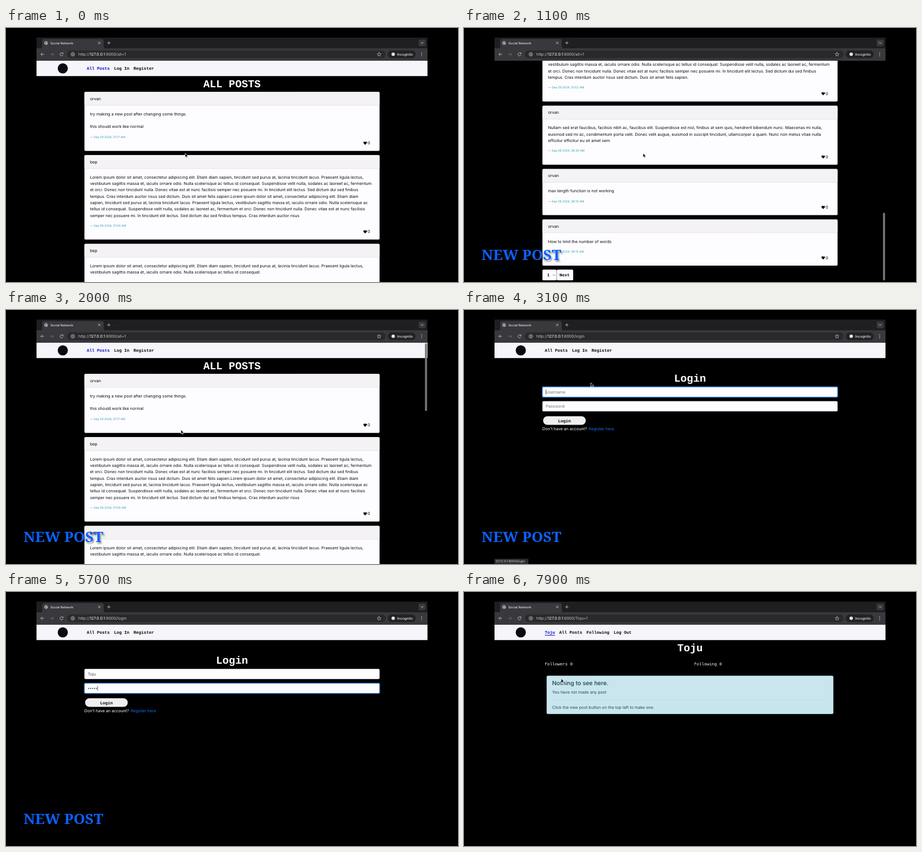
Write an HTML page that moves like this. It is 800x450 px and loops after 8 s.

```html
<!DOCTYPE html>
<html lang="en">
<head>
<meta charset="utf-8">
<style>
html, body { margin: 0; width: 100%; height: 100%; overflow: hidden; background: #000; }
svg { position: absolute; left: 0; top: 0; font-family: Inter, sans-serif; }
text { white-space: pre; text-rendering: geometricPrecision; }
.mono { font-family: "Liberation Mono", monospace; }
.bold { font-weight: 700; }
.mid { font-weight: 500; }
#title { position: absolute; left: 31px; top: 383.3px; white-space: pre; color: #0a62ff;
  font: 700 26px "Noto Serif", serif; text-shadow: 2px 3px 3px rgba(0,0,0,.42); }
#title span { display: inline-block; }
</style>
</head>
<body>
<svg id="stage" width="800" height="450" viewBox="0 0 800 450"></svg>
<div id="title"></div>
<script>
const LOOP = 8000, LINE = 11.295, BODY = 7.18, BOTTOM = 866.8, USER = "Toju";
const INK = "#0a0a0a", BLUE = "#0b10c8", PAPER = "#fdfcff";

const rect = (x, y, w, h, fill, r = 0, more = "") =>
  `<rect x="${x}" y="${y}" width="${w}" height="${h}" rx="${r}" fill="${fill}" ${more}/>`;
const text = (x, y, str, size, fill, cls = "", more = "") =>
  `<text x="${x}" y="${y}" font-size="${size}" fill="${fill}" class="${cls}" ${more}>${str}</text>`;
const line = (d, stroke, width = 1) =>
  `<path d="${d}" fill="none" stroke="${stroke}" stroke-width="${width}" stroke-linecap="round" stroke-linejoin="round"/>`;
const group = (id, body) => `<g id="${id}">${body}</g>`;
const heading = (str, y) => text(400, y, str, 18.83, "#fff", "mono bold", 'text-anchor="middle"');

// Post texts
const L1 = "Lorem ipsum dolor sit amet, consectetur adipiscing elit. Etiam diam sapien, tincidunt sed purus at, lacinia tincidunt lacus. Praesent ligula lectus,";
const L2 = "vestibulum sagittis massa et, iaculis ornare odio. Nulla scelerisque ac tellus id consequat.";
const L2b = L2 + " Suspendisse velit nulla, sodales ac laoreet ac, fermentum";
const L3 = "et orci. Donec non tincidunt nulla. Donec vitae est at nunc facilisis semper nec posuere mi. In tincidunt elit lectus. Sed dictum dui sed finibus";
const L4 = "tempus. Cras interdum auctor risus sed dictum. Duis sit amet felis sapien.";
const S1 = "Suspendisse velit nulla, sodales ac laoreet ac, fermentum et orci. Donec non tincidunt nulla. Donec vitae est at nunc facilisis semper nec posuere";
const S2 = "mi. In tincidunt elit lectus. Sed dictum dui sed finibus " + L4;
const posts = [
  ["orvan", "09 2024, 01:17", ["try making a new post after changing some things.", "", "this should work like normal"]],
  ["bep", "09 2024, 01:04", [L1, L2b, L3,
    L4 + "Lorem ipsum dolor sit amet, consectetur adipiscing elit. Etiam diam",
    "sapien, tincidunt sed purus at, lacinia tincidunt lacus. Praesent ligula lectus, vestibulum sagittis massa et, iaculis ornare odio. Nulla scelerisque ac",
    "tellus id consequat. Suspendisse velit nulla, sodales ac laoreet ac, fermentum et orci. Donec non tincidunt nulla. Donec vitae est at nunc facilisis",
    "semper nec posuere mi. In tincidunt elit lectus. Sed dictum dui sed finibus tempus. Cras interdum auctor risus"]],
  ["bep", "09 2024, 01:04", [L1, L2, "", S1, S2]],
  ["bep", "09 2024, 01:04", [L1, L2b, L3, L4]],
  ["dumpling", "09 2024, 01:03", ["Man, could do with a dumpling right now", "", "right now", "", "and we-"]],
  ["bep", "09 2024, 01:03", [S1, S2]],
  ["bep", "09 2024, 01:02", [L1, L2b, L3, L4]],
  ["orvan", "08 2024, 08:30", [
    "Nullam sed erat faucibus, facilisis nibh ac, faucibus elit. Suspendisse est nisl, finibus at sem quis, hendrerit bibendum nunc. Maecenas mi nulla,",
    "euismod sed mi ac, condimentum porta velit. Donec velit augue, euismod in suscipit tincidunt, ullamcorper a quam. Nunc non metus vitae nulla",
    "efficitur efficitur eu sit amet sem"]],
  ["orvan", "08 2024, 08:19", ["max length function is not working"]],
  ["orvan", "08 2024, 08:15", ["How to limit the number of words"]]
];

function post(top, [name, date, lines]) {
  const stamp = top + 57.2 + LINE * (lines.length - 1), h = 70.5 + LINE * lines.length;
  const hy = stamp + 7.4;
  return rect(138.8, top, 522.4, h, PAPER, 1.9) +
    rect(138.8, top, 522.4, 23.6, "#f4f2f5", 1.9) +
    rect(138.8, top + 23.4, 522.4, .6, "#d8d6da") +
    text(148.7, top + 14.7, name, BODY, INK) +
    lines.map((s, i) => text(148.7, top + 41.6 + LINE * i, s, BODY, INK)).join("") +
    text(148.7, stamp + 1.8, `— Sep ${date} AM`, 5.15, "#2a9fb0") +
    `<path d="M635.7 ${hy + 6.4}l-2.7-2.8c-1.3-1.6.9-4.2 2.7-2.1c1.8-2.1 4 .5 2.7 2.1z" fill="#000"/>` +
    text(640, hy + 5.8, "0", BODY, INK);
}

function feed() {
  let y = 113.3, out = heading("ALL POSTS", 105);
  for (const p of posts) {
    out += post(y, p);
    y += 78.1 + LINE * p[2].length;
  }
  return out + rect(138.8, y - .5, 25, 19, PAPER, 1.9) + rect(164.2, y - .5, 29, 19, PAPER, 1.9) +
    text(147, y + 11.5, "1", 7.53, INK, "mono bold") +
    line(`M157.5 ${y + 8.5}l1.8 1.8l1.8-1.8`, "#444", .7) +
    text(169, y + 11.5, "Next", 7.53, INK, "mono bold");
}

const field = (id, y) =>
  rect(138.8, y, 522.4, 18, PAPER, 1.9) +
  rect(138.6, y - .2, 522.8, 18.4, "none", 2.2, `id="${id}" stroke="#2f6fc4" stroke-width="1.5"`);

const login = heading("Login", 127.4) + field("ring0", 136.2) + field("ring1", 161.6) +
  text(144.7, 147.8, "", BODY, "#6c757d", "", 'id="user"') +
  text(144.7, 173.2, "Password", BODY, "#6c757d", "", 'id="hint"') + group("dots", "") +
  rect(0, 0, .7, 8.5, "#222", 0, 'id="caret"') +
  rect(140, 188.2, 75.5, 15.2, "#efeff0", 7.6) +
  text(177.8, 198.7, "Login", 7.53, INK, "mono bold", 'text-anchor="middle"') +
  text(138.8, 213.2, "Don't have an account?", 7.1, "#fff") +
  text(220.8, 213.2, "Register here.", 7.1, "#0d76f0");

const profile = heading(USER, 105) +
  text(142.7, 129.6, "followers 0", 7.53, "#fff", "mono") +
  text(407, 129.6, "following 0", 7.53, "#fff", "mono") +
  rect(146.5, 148.6, 507, 67.3, "#c9e6ee", 1.9, 'stroke="#b5dce6" stroke-width=".5"') +
  text(156, 165, "Nothing to see here.", 10.3, "#1b3f48", "mid") +
  text(156, 180.4, "You have not made any post", BODY, "#1f4d58") +
  rect(156, 190.8, 490, .5, "#b2d5de") +
  text(156, 207, "Click the new post button on the top left to make one.", BODY, "#1f4d58");

function navLinks(names, active, underlined) {
  let x = 143;
  return names.map(n => {
    const w = n.length * 4.518, fill = n === active ? BLUE : "#080808";
    const out = text(x, 74.2, n, 7.53, fill, "mono bold") +
      (n === underlined ? rect(x, 76.2, w, 1, BLUE) : "");
    x += w + 7.53;
    return out;
  }).join("");
}
const nav = rect(54, 58, 692, 27.2, "#f5f5fa") +
  '<circle cx="100.5" cy="71.6" r="9" fill="#0a0a12"/>' + group("links", "");

const icon = "#c9c8cc";
const browser = rect(0, 0, 800, 17, "#000") + rect(0, 17, 54, 41, "#000") + rect(746, 17, 54, 41, "#000") +
  rect(54, 17, 692, 20, "#1f1e21") +
  '<path d="M60 36.5q4 0 4-4v-9q0-4 4-4h101q4 0 4 4v9q0 4 4 4z" fill="#39383c"/>' +
  rect(54, 36, 692, 22, "#39383c") +
  '<circle cx="71" cy="26.5" r="3.2" fill="#a9a8ad"/>' +
  line("M69 25l2 1.2l-.8 1.6M72.3 24.2l.5 1.3l1 .2", "#39383c", .7) +
  text(78.5, 28.5, "Social Network", 5.6, "#e6e5e8", "mid") +
  line("M163.3 24.6l3.6 3.6m0-3.6l-3.6 3.6", "#dddce0", .8) +
  line("M179.5 26.4h5m-2.5-2.5v5", icon, .8) +
  rect(730.3, 20.6, 12.6, 11.6, "#39383c", 3) + line("M734.7 25.6l1.9 1.9l1.9-1.9", "#eee", .8) +
  line("M67.2 46.6h-5.4m2.4-2.5l-2.5 2.5l2.5 2.5", icon, .8) +
  line("M78.6 46.6h5.4m-2.4-2.5l2.5 2.5l-2.5 2.5", "#77767a", .8) +
  line("M100.6 45a2.8 2.8 0 1 0 .3 2.6M100.9 43.6v1.8h-1.8", icon, .8) +
  rect(108, 39.8, 564, 13.6, "#29282b", 6.8) +
  '<circle cx="118.2" cy="46.6" r="5.2" fill="#39383c"/><circle cx="118.2" cy="46.6" r="2.7" fill="none" stroke="#ddd" stroke-width=".7"/>' +
  line("M118.2 46.4v1.4M118.2 45.2v.01", "#ddd", .7) +
  text(128, 49, "", 7.05, "#c4c3c7", "", 'id="url"') +
  line("M660.3 43.3l1 2.2l2.4.2l-1.8 1.6l.5 2.4l-2.1-1.3l-2.1 1.3l.5-2.4l-1.8-1.6l2.4-.2z", icon, .7) +
  rect(675.6, 39.8, 49.5, 13.6, "#222124", 6.8) +
  '<circle cx="685.3" cy="46.6" r="3" fill="#e4e3e6"/>' +
  text(692.3, 48.9, "Incognito", 6.2, "#eee", "mid") +
  [43.7, 46.5, 49.3].map(y => `<circle cx="735.7" cy="${y}" r=".75" fill="${icon}"/>`).join("");

const $ = id => document.getElementById(id);
$("stage").innerHTML =
  group("page", group("feed", feed()) + group("login", login) + group("profile", profile) + nav) +
  rect(741.6, 0, 3.6, 120, "#777", 1.8, 'id="thumb"') + browser +
  group("status", rect(54, 440.8, 60, 9.2, "#2d2c2f", 1) + text(56, 447.3, "", 5.6, "#d5d4d8", "", 'id="link"')) +
  '<path id="cursor" d="M0 0v7.2l1.7-1.5l1.1 2.5l1.3-.6l-1.1-2.4h2.3z" fill="#000" stroke="#fff" stroke-width=".7"/>';
$("title").innerHTML = [..."NEW POST"].map(c => `<span>${c}</span>`).join("");
const letters = [...$("title").children];

// Timing
const clamp = (t, a, b) => Math.min(1, Math.max(0, (t - a) / (b - a)));
const ease = (t, a, b) => { const k = clamp(t, a, b); return k * k * (3 - 2 * k); };
const between = (t, a, b) => t >= a && t < b;
const show = (id, on) => $(id).setAttribute("visibility", on ? "visible" : "hidden");
const path = [[0, 317, 222], [1900, 317, 222], [2550, 204, 71], [2880, 204, 71], [3100, 224.5, 129],
  [5850, 224.5, 129], [6150, 203.5, 199.5], [6520, 203.5, 199.5], [6950, 152, 71], [7350, 152, 71], [7800, 172, 153.5]];

function cursorAt(t) {
  const i = path.findIndex(p => p[0] > t);
  if (i < 0) return path[path.length - 1].slice(1);
  const [a, x, y] = path[i - 1], [b, u, v] = path[i], k = ease(t, a, b);
  return [x + (u - x) * k, y + (v - y) * k];
}

let navState;
function setNav(state) {
  if (state === navState) return;
  navState = state;
  const [member, active, url] = state.split("|");
  const names = member ? [USER, "All Posts", "Following", "Log Out"] : ["All Posts", "Log In", "Register"];
  $("links").innerHTML = navLinks(names, active, member && USER);
  $("url").innerHTML = `http://<tspan fill="#fff">127.0.0.1</tspan>:8000/${url}`;
}

function drawForm(t) {
  const typed = Math.floor(clamp(t, 3850, 4450) * 4), second = t >= 4800;
  const n = Math.floor(clamp(t, 4860, 5560) * 5);
  $("user").textContent = typed ? USER.slice(0, typed) : "Username";
  $("user").setAttribute("fill", typed ? "#495057" : "#6c757d");
  show("hint", !n);
  $("dots").innerHTML = Array.from({ length: n }, (_, i) =>
    `<circle cx="${146.4 + 3.4 * i}" cy="170.8" r=".95" fill="#333"/>`).join("");
  show("ring0", !second);
  show("ring1", second);
  const typing = between(t, 3850, 4600) || between(t, 4800, 5800);
  show("caret", typing || (t - 2900) % 1000 < 500);
  const width = typed ? $("user").getComputedTextLength() : 0;
  $("caret").setAttribute("x", second ? 144.7 + 3.4 * n : 144.7 + width);
  $("caret").setAttribute("y", second ? 166.4 : 141);
}

function draw(t) {
  const onLogin = between(t, 2900, 6400), onProfile = t >= 7300;
  for (const [id, on] of [["feed", !onLogin && !onProfile], ["login", onLogin], ["profile", onProfile]])
    $(id).style.display = on ? "" : "none";
  setNav(onProfile ? `1|${USER}|${USER}=1` : onLogin ? "||login" : t >= 6400 ? "1|All Posts|all=1" : "|All Posts|all=1");
  if (onLogin) drawForm(t);

  const scroll = BOTTOM * (ease(t, 301, 1141) - ease(t, 1540, 1860));
  $("page").setAttribute("transform", `translate(0 ${-scroll})`);
  $("thumb").setAttribute("y", 59 + 270 * scroll / BOTTOM);
  $("thumb").setAttribute("opacity", t < 300 ? 0 : t < 1540 ? 1 - .65 * clamp(t, 1400, 1500) : 1 - clamp(t, 2300, 2500));

  const hoverUser = between(t, 6920, 7500);
  show("status", between(t, 2600, 3250) || hoverUser);
  $("link").textContent = "127.0.0.1:8000/" + (hoverUser ? USER + "=1" : "login");

  $("cursor").setAttribute("transform", `translate(${cursorAt(t)})`);
  show("cursor", !between(t, 3850, 5850));

  letters.forEach((el, i) => {
    const k = clamp(t, 100 + 60 * i, 350 + 60 * i), gone = ease(t, 7150 + 55 * i, 7400 + 55 * i);
    const off = (1 - k) ** 2 + gone;
    el.style.opacity = Math.min(1, 2 * k) * (1 - gone);
    el.style.transform = `translate(${4 * off}px, ${28 * off}px)`;
  });
}

const start = performance.now();
(function tick() {
  draw((performance.now() - start) % LOOP);
  requestAnimationFrame(tick);
})();
</script>
</body>
</html>
```
